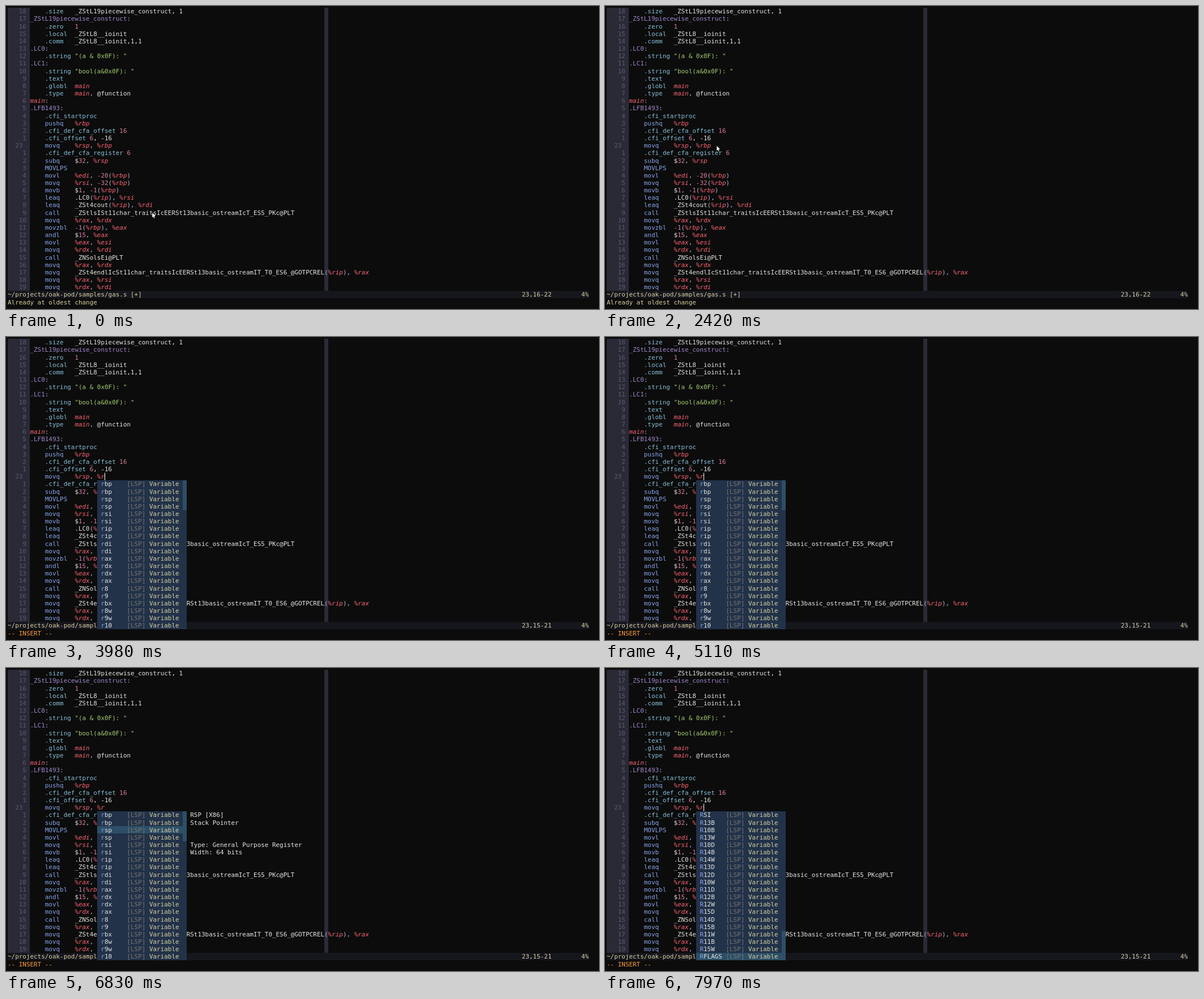
These frames come from a looping animation (1047x535 px, 8000 ms). An HTML page with a canvas:

```html
<!DOCTYPE html>
<html lang="en">
<head>
<meta charset="utf-8">
<title>Editor completion</title>
<style>
  html, body { margin: 0; width: 100%; height: 100%; overflow: hidden; background: #0c0c0c; }
  canvas { display: block; width: 1047px; height: 535px; }
</style>
</head>
<body>
<canvas id="stage"></canvas>
<script>
const W = 1047, H = 535, LOOP = 8000;
const CELL_W = 6.577, CELL_H = 13.16, LEFT = 3, TOP = 2.9, COLUMNS = 156;
const CODE_COL = 6, CURRENT_ROW = 18, STATUS_ROW = 38, MENU_COL = 24, MENU_ROW = 19, MENU_SIZE = 20;
const FONT = '10.92px "DejaVu Sans Mono", "Noto Sans Mono", monospace';
const C = {
  bg: '#0c0c0c', gutter: '#2a2a37', lineNo: '#5a5a74', text: '#e6e6e2', dim: '#d9d0a2',
  label: '#a088cc', directive: '#86c0d8', op: '#86a6ea', reg: '#fa6474', num: '#e07f9f',
  str: '#a4cc70', punct: '#a8b6d4', status: '#16161d', mode: '#ff9e3b',
  menu: '#223249', picked: '#2d4f67', source: '#777670'
};

const CODE = `    .size   _ZStL19piecewise_construct, 1
_ZStL19piecewise_construct:
    .zero   1
    .local  _ZStL8__ioinit
    .comm   _ZStL8__ioinit,1,1
.LC0:
    .string "(a & 0x0F): "
.LC1:
    .string "bool(a&0x0F): "
    .text
    .globl  main
    .type   main, @function
main:
.LFB1493:
    .cfi_startproc
    pushq   %rbp
    .cfi_def_cfa_offset 16
    .cfi_offset 6, -16
    movq    %rsp, %rbp
    .cfi_def_cfa_register 6
    subq    $32, %rsp
    MOVLPS
    movl    %edi, -20(%rbp)
    movq    %rsi, -32(%rbp)
    movb    $1, -1(%rbp)
    leaq    .LC0(%rip), %rsi
    leaq    _ZSt4cout(%rip), %rdi
    call    _ZStlsISt11char_traitsIcEERSt13basic_ostreamIcT_ES5_PKc@PLT
    movq    %rax, %rdx
    movzbl  -1(%rbp), %eax
    andl    $15, %eax
    movl    %eax, %esi
    movq    %rdx, %rdi
    call    _ZNSolsEi@PLT
    movq    %rax, %rdx
    movq    _ZSt4endlIcSt11char_traitsIcEERSt13basic_ostreamIT_T0_ES6_@GOTPCREL(%rip), %rax
    movq    %rax, %rsi
    movq    %rdx, %rdi`.split('\n');

const FIRST_ITEMS = 'rbp rbp rsp rsp rsi rsi rip rip rdi rdi rax rdx rdx rax r8 r9 rbx r8w r9w r10'.split(' ');
const LAST_ITEMS = ('RSI R13B R10B R13W R10D R14B R14W R13D R12D R10W R11D R12B R12W ' +
  'R15D R14D R15B R11W R11B R15W RFLAGS').split(' ');

const DOCS = {
  base: { name: 'RBP', info: 'Base Pointer (meant for stack frames)' },
  stackBase: { name: 'RBP', info: 'Stack Base Pointer' },
  stack: { name: 'RSP', info: 'Stack Pointer' }
};

// Each entry changes part of the editor state from its time on.
const EVENTS = [
  [0, { reg: '%rbp', byte: 16, insert: false, caret: '', mouse: true, menu: null, pick: -1, doc: null }],
  [1830, { caret: 'block' }],
  [2420, { caret: '' }],
  [2490, { insert: true, caret: 'bar' }],
  [2560, { mouse: false }],
  [2960, { byte: 17 }],
  [3650, { reg: '%rb', byte: 16 }],
  [3910, { reg: '%r', byte: 15 }],
  [3980, { menu: FIRST_ITEMS }],
  [4510, { caret: '' }],
  [5110, { caret: 'bar' }],
  [5650, { pick: 0, doc: DOCS.base }],
  [6050, { pick: 1, doc: DOCS.stackBase }],
  [6240, { pick: 2 }],
  [6320, { doc: DOCS.stack }],
  [6830, { caret: '' }],
  [6960, { caret: 'bar', pick: 1 }],
  [7030, { doc: DOCS.stackBase }],
  [7230, { pick: 0 }],
  [7300, { doc: DOCS.base }],
  [7560, { pick: -1 }],
  [7640, { doc: null }],
  [7970, { menu: LAST_ITEMS, pick: 19 }]
];

const canvas = document.getElementById('stage');
const ctx = canvas.getContext('2d');
const ratio = window.devicePixelRatio || 1;
canvas.width = W * ratio;
canvas.height = H * ratio;
ctx.scale(ratio, ratio);

const colX = col => LEFT + col * CELL_W;
const rowY = row => TOP + row * CELL_H;

function fillCells(col, row, cols, rows, color) {
  ctx.fillStyle = color;
  const x = Math.round(colX(col)), y = Math.round(rowY(row));
  ctx.fillRect(x, y, Math.round(colX(col + cols)) - x, Math.round(rowY(row + rows)) - y);
}

function put(col, row, text, color, italic = false) {
  ctx.font = (italic ? 'italic ' : '') + FONT;
  ctx.fillStyle = color;
  [...text].forEach((ch, i) => {
    if (ch !== ' ') ctx.fillText(ch, colX(col + i), rowY(row) + 10.4);
  });
}

const TOKEN = /"[^"]*"|%\w+|\bmain\b|, ?-?\d+(?![\d(])|[_.@A-Z][\w@]*|-?\d+|[(),]|\$/g;

function operandColor(tok) {
  if (tok[0] === '"') return C.str;
  if (tok[0] === '%' || tok === 'main') return C.reg;
  if (/^-?\d+$/.test(tok)) return C.num;
  if (/^[(),]$/.test(tok)) return C.punct;
  return C.text;
}

function drawCode(line, row) {
  if (line.endsWith(':')) {
    const name = line.slice(0, -1), isMain = name === 'main';
    put(CODE_COL, row, name, isMain ? C.reg : C.label, isMain);
    put(CODE_COL + name.length, row, ':', C.punct);
    return;
  }
  const [op] = line.trim().split(' ');
  put(CODE_COL + 4, row, op, op[0] === '.' ? C.directive : C.op);
  const start = 4 + op.length;
  for (const m of line.slice(start).matchAll(TOKEN)) {
    const color = operandColor(m[0]);
    put(CODE_COL + start + m.index, row, m[0], color, color === C.reg);
  }
}

function drawPage(s) {
  ctx.fillStyle = C.bg;
  ctx.fillRect(0, 0, W, H);
  fillCells(0, 0, CODE_COL, STATUS_ROW, C.gutter);
  fillCells(85, 0, 1, STATUS_ROW, C.gutter);
  CODE.forEach((line, row) => {
    const current = row === CURRENT_ROW;
    const no = current ? '23' : String(Math.abs(row - CURRENT_ROW));
    put(current ? 2 : 5 - no.length, row, no, C.lineNo);
    drawCode(current ? line.replace('%rbp', s.reg) : line, row);
  });
  fillCells(0, STATUS_ROW, COLUMNS, 1, C.status);
  put(0, STATUS_ROW, '~/projects/oak-pod/samples/gas.s [+]', C.dim);
  put(138, STATUS_ROW, `23,${s.byte}-${s.byte + 6}`, C.dim);
  put(154, STATUS_ROW, '4%', C.dim);
  if (s.insert) put(0, STATUS_ROW + 1, '-- INSERT --', C.mode);
  else put(0, STATUS_ROW + 1, 'Already at oldest change', C.dim);
}

function drawCaret(s) {
  const col = s.byte + 11;
  if (s.caret === 'block') {
    fillCells(col, CURRENT_ROW, 1, 1, C.text);
    put(col, CURRENT_ROW, 'p', C.bg, true);
  } else if (s.caret === 'bar') {
    ctx.fillStyle = '#ffffff';
    ctx.fillRect(Math.round(colX(col)), rowY(CURRENT_ROW), 1, CELL_H);
  }
}

function drawMenu(s) {
  fillCells(MENU_COL, MENU_ROW, 24, MENU_SIZE, C.menu);
  const thumb = s.menu === LAST_ITEMS ? MENU_SIZE - 4 : 0;
  fillCells(MENU_COL + 23, MENU_ROW + thumb, 1, 4, C.picked);
  if (s.pick >= 0) fillCells(MENU_COL, MENU_ROW + s.pick, 23, 1, C.picked);
  s.menu.forEach((item, i) => {
    const row = MENU_ROW + i;
    put(MENU_COL + 1, row, item[0], C.op);
    put(MENU_COL + 2, row, item.slice(1), C.text);
    put(MENU_COL + 8, row, '[LSP]', C.source);
    put(MENU_COL + 14, row, 'Variable', C.dim);
  });
}

function drawDoc({ name, info }) {
  const lines = [`${name} [X86]`, info, '', '', 'Type: General Purpose Register', 'Width: 64 bits'];
  const width = Math.max(...lines.map(line => line.length)) + 1;
  fillCells(48, MENU_ROW, width, lines.length, C.bg);
  lines.forEach((line, i) => put(49, MENU_ROW + i, line, C.text));
}

// Share of a stepped move done at time t, in `count` equal steps from `from` to `to`.
function stepped(t, from, to, count) {
  if (t < from) return 0;
  return Math.min(count, Math.floor((t - from) / (to - from) * (count - 1) + 1e-6) + 1) / count;
}

const curve = (a, b, c, k) => (1 - k) ** 2 * a + 2 * k * (1 - k) * b + k * k * c;

function drawMouse(t) {
  let x, y;
  if (t < 700) {
    const k = stepped(t, 70, 300, 4);
    x = 258 - 40 * k;
    y = 365 - 29 * k;
  } else {
    const k = stepped(t, 700, 1500, 13);
    x = curve(218, 51, 197, k);
    y = curve(336, 285, 247, k);
  }
  ctx.save();
  ctx.translate(x, y);
  const arrow = new Path2D('M0.3 0V8.4L2.2 6.7L3.5 9.7L4.8 9.1L3.6 6.3L6.1 6.1Z');
  ctx.lineWidth = 0.8;
  ctx.strokeStyle = '#000';
  ctx.stroke(arrow);
  ctx.fillStyle = '#fff';
  ctx.fill(arrow);
  ctx.restore();
}

function draw(t) {
  const s = {};
  for (const [at, change] of EVENTS) if (t >= at) Object.assign(s, change);
  drawPage(s);
  drawCaret(s);
  if (s.menu) drawMenu(s);
  if (s.doc) drawDoc(s.doc);
  if (s.mouse) drawMouse(t);
}

const begin = performance.now();
function tick() {
  draw((performance.now() - begin) % LOOP);
  requestAnimationFrame(tick);
}
tick();
</script>
</body>
</html>
```
